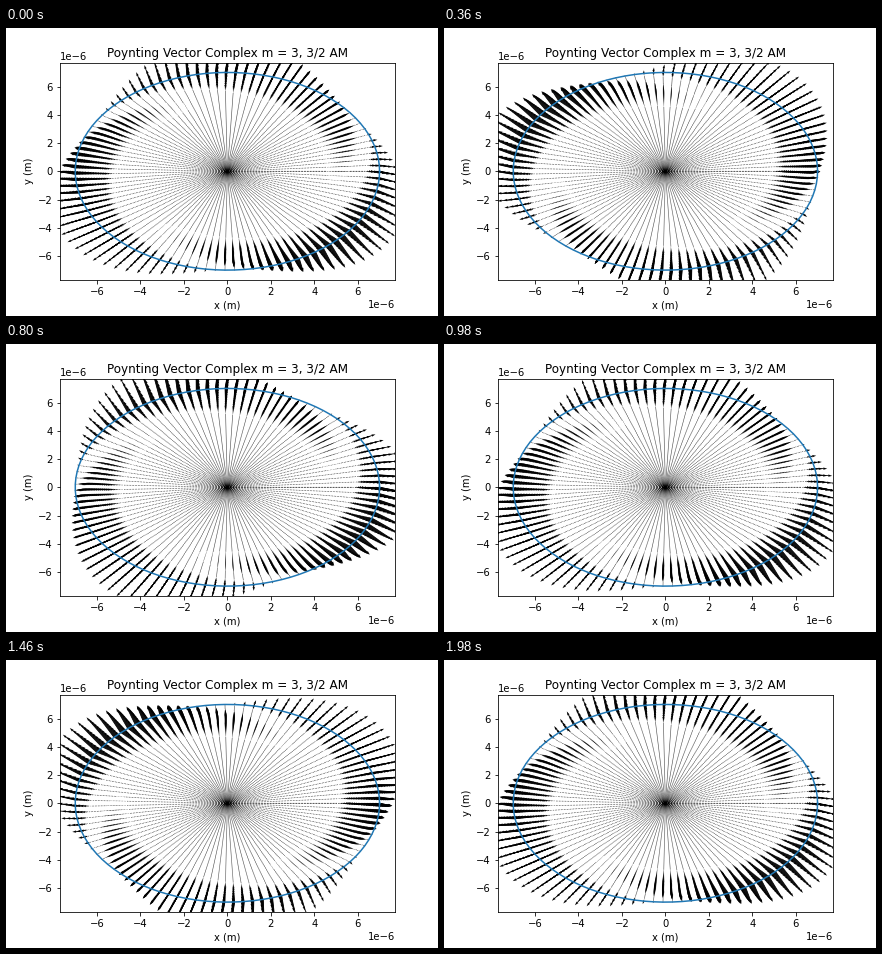
A matplotlib script for the animation above (2000 ms loop, 432 px wide and 288 px high).

```python
import numpy as np
import matplotlib.pyplot as plt
from matplotlib.animation import FuncAnimation

R = 7e-6          # cylinder radius
FRAMES = 100
AMP = 37          # peak flow at the rim, px
GROWTH = 9        # radial power law
SWIRL = 0.2       # azimuthal to radial flow
K = 0.92e6        # radial wave number
NULL = np.radians(33)       # angle of a rim null at the start
WIDTH = 0.06 * 334.8 / 25   # shaft width, px

fig, ax = plt.subplots(figsize=(6, 4), dpi=72)
fig.subplots_adjust(left=0.125, right=0.9, bottom=0.125, top=0.88)
ax.set(xlim=(-1.1 * R, 1.1 * R), ylim=(-1.1 * R, 1.1 * R),
       xlabel="x (m)", ylabel="y (m)",
       title="Poynting Vector Complex m = 3, 3/2 AM")

theta = np.linspace(0, 2 * np.pi, 100)
radius = np.linspace(0, R, 100)
still = radius < 0.62 * R   # flow too weak here to show more than a dot


def grid(radii):
    r, t = np.meshgrid(radii, theta)
    return r, t, r * np.cos(t), r * np.sin(t)


# one size per dot keeps the dots off the pixel grid
_, _, x, y = grid(radius[still])
ax.scatter(x, y, s=np.full(x.shape, WIDTH ** 2), marker="H", color="k",
           linewidths=0, zorder=1)

r, t, x, y = grid(radius[~still])
gain = AMP * (r / R) ** GROWTH


def flow(i):
    wt = 2 * np.pi * i / (FRAMES - 1)
    s = gain * np.sin(1.5 * (t - NULL) + wt - K * (r - R)) ** 2
    return (s * (np.cos(t) + SWIRL * np.sin(t)),
            s * (np.sin(t) - SWIRL * np.cos(t)))


arrows = ax.quiver(x, y, *flow(0), units="dots", width=WIDTH,
                   scale_units="dots", scale=1, zorder=1)
ax.plot(R * np.cos(theta), R * np.sin(theta), color="C0")


def update(i):
    arrows.set_UVC(*flow(i))
    return arrows,


anim = FuncAnimation(fig, update, frames=FRAMES, interval=20, repeat=True)
plt.show()
```
